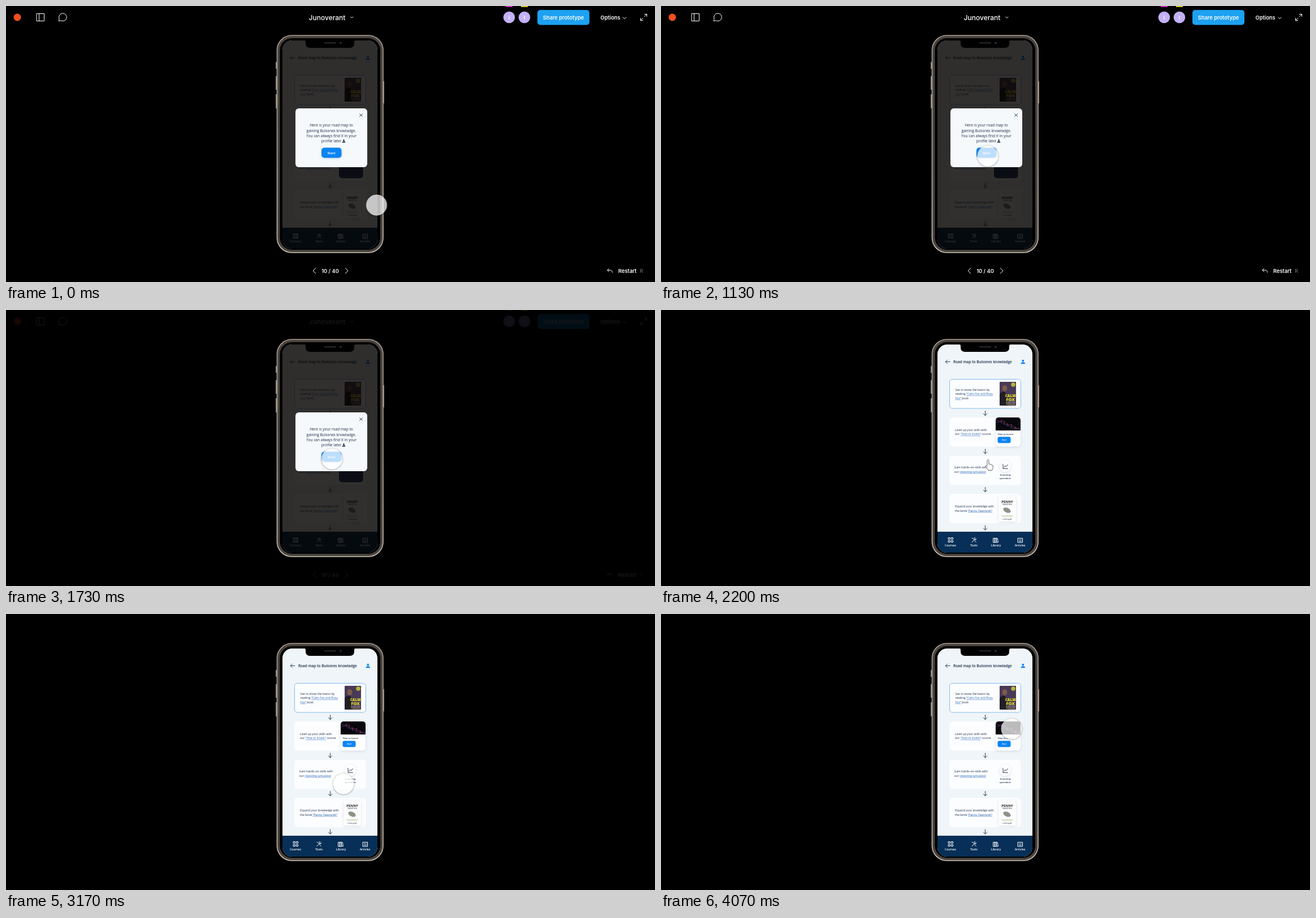
Recreate the animation shown at these times as an HTML page. Size 1148 px wide and 488 px high, loop 4.11 s.

```html
<!DOCTYPE html>
<html lang="en">
<head>
<meta charset="utf-8">
<title>Prototype walkthrough</title>
<style>
  html, body { margin: 0; width: 100%; height: 100%; overflow: hidden; background: #000; }
  svg { display: block; width: 100vw; height: 100vh; }
  text { white-space: pre; }
  .ui text { font: 600 9.3px Inter, sans-serif; fill: #fff; }
  .ui .name { font-size: 12px; font-weight: 500; }
  .app text { font: 400 5.13px "Open Sans", "Noto Sans", sans-serif; fill: #1b2c47; }
  .app .title { font-size: 6.45px; font-weight: 600; }
  .app .tab text { font-size: 5.2px; font-weight: 600; fill: #fff; }
  .app .msg text { font-size: 6.6px; }
  .app .tiny text { font-size: 4.2px; font-weight: 600; }
  .app .btn { font-weight: 700; fill: #fff; }
  .link { fill: #2465b5; text-decoration: underline; text-decoration-thickness: .4px; }
  .mid { text-anchor: middle; }
  .line { fill: none; stroke: #fff; stroke-width: 1; stroke-linecap: round; stroke-linejoin: round; }
  .ink { stroke: #1b2c47; stroke-width: .9; }
  .soft { filter: drop-shadow(0 1.5px 2px rgba(60, 90, 130, .2)); }

  .ui, .modal, .touch, .hand { animation: 4110ms linear infinite; }
  .ui { animation-name: ui; }
  .modal { animation-name: modal; }
  .touch { animation-name: touch; }
  .hand { animation-name: hand; }

  @keyframes ui {
    0%, 37.2% { opacity: 1; }
    42.1% { opacity: .09; }
    44%, 100% { opacity: 0; }
  }
  @keyframes modal {
    0%, 49.4% { opacity: 1; }
    53.2%, 100% { opacity: 0; }
  }
  @keyframes touch {
    0%, .73% { transform: translate(655.5px, 352px); opacity: 1; animation-timing-function: ease-in-out; }
    13.1% { transform: translate(578.5px, 267.5px); }
    27.5% { transform: translate(578px, 265px); }
    42.1% { transform: translate(576.5px, 263px); }
    51.1% { transform: translate(577px, 264px); opacity: 1; animation-timing-function: step-end; }
    51.11% { transform: translate(577px, 264px); opacity: 0; }
    58.39% { transform: translate(577px, 266px); opacity: 0; animation-timing-function: step-end; }
    58.4% { transform: translate(577px, 266px); opacity: 1; animation-timing-function: ease-in-out; }
    66.9%, 78.6% { transform: translate(597px, 300px); animation-timing-function: ease-in-out; }
    90%, 100% { transform: translate(620px, 203px); opacity: 1; }
  }
  @keyframes hand {
    0%, 51.1% { opacity: 0; animation-timing-function: step-end; }
    51.11%, 58.39% { opacity: 1; animation-timing-function: step-end; }
    58.4%, 100% { opacity: 0; }
  }
</style>
</head>
<body>
<svg viewBox="0 0 1148 488" xmlns="http://www.w3.org/2000/svg">
  <defs>
    <clipPath id="screen"><rect x="489" y="61" width="168" height="368" rx="17"/></clipPath>
    <clipPath id="chart"><path d="M592 213V195a5 5 0 0 1 5-5h34a5 5 0 0 1 5 5v18z"/></clipPath>
    <clipPath id="cover"><rect x="599" y="127" width="29" height="42" rx="1"/></clipPath>
    <linearGradient id="metal" x2="0" y2="1">
      <stop offset="0" stop-color="#aaa097"/>
      <stop offset=".5" stop-color="#b5aaa0"/>
      <stop offset="1" stop-color="#d2c8be"/>
    </linearGradient>
    <radialGradient id="halo">
      <stop offset=".84" stop-opacity="0"/>
      <stop offset=".85" stop-opacity=".2"/>
      <stop offset="1" stop-opacity="0"/>
    </radialGradient>
    <path id="down" class="line ink" d="M0-4V4M-3.3 .8L0 4L3.3 .8"/>
    <g id="user">
      <circle cy="-2" r="1.9"/>
      <path d="M-3.8 3.6v-.8C-3.8 .9-1.6 .5 0 .5S3.8 .9 3.8 2.8v.8z"/>
    </g>
  </defs>

  <rect width="1148" height="488"/>

  <!-- Viewer controls -->
  <g class="ui">
    <circle cx="20" cy="20" r="6.5" fill="#f24e1e"/>
    <path class="line" d="M54.5 13.5h13v13h-13zM58.5 13.5v13"/>
    <path class="line" d="M93.5 26.5l.5-4.300a6.900 6.900 0 1 1 3 3.600z"/>
    <text class="name mid" x="568" y="24.800">Junoverant</text>
    <path class="line" d="M609.500 19l2.200 2.200l2.200-2.200"/>
    <rect x="884" width="12" height="1.800" fill="#e128d2"/>
    <rect x="911" width="12" height="1.800" fill="#efdb18"/>
    <circle cx="890" cy="20" r="10.300" fill="#c3b0f6"/>
    <circle cx="917" cy="20" r="10.300" fill="#c3b0f6"/>
    <text class="mid" x="890" y="23.500">I</text>
    <text class="mid" x="917" y="23.500">I</text>
    <rect x="940" y="7" width="92" height="26.500" rx="5" fill="#1da1f2"/>
    <text class="mid" x="986" y="23.500">Share prototype</text>
    <text x="1051.500" y="23.500">Options</text>
    <path class="line" d="M1091.500 20l2.700 2.700l2.700-2.700"/>
    <path class="line" d="M1129.500 14.500h4v4M1133.300 14.700l-4 4M1126.500 25.500h-4v-4M1122.700 25.300l4-4"/>
    <path class="line" d="M547.800 463.500l-4.800 4.700l4.800 4.700M600.200 463.500l4.800 4.700l-4.800 4.700"/>
    <text class="mid" x="573.500" y="471.500">10 / 40</text>
    <path class="line" d="M1066.500 464.500l-2.800 2.700l2.800 2.700M1064 467.200h5.500q3 0 3 3.800"/>
    <text x="1083" y="471.500">Restart</text>
    <text x="1121" y="471.500" style="fill:#777;font-weight:400">R</text>
  </g>

  <!-- Phone body -->
  <g fill="#8d8276">
    <rect x="477" y="99" width="2" height="12"/>
    <rect x="477" y="124" width="2" height="24"/>
    <rect x="477" y="156" width="2" height="25"/>
    <rect x="667" y="133" width="2" height="39" fill="#947a70"/>
  </g>
  <rect x="479.500" y="52" width="187.500" height="384" rx="26" fill="#4a443f" stroke="url(#metal)" stroke-width="1.500"/>
  <rect x="484" y="56.500" width="178.500" height="375" rx="22" fill="#000" stroke="#423d39"/>

  <g class="app" clip-path="url(#screen)">
    <rect x="489" y="61" width="168" height="370" fill="#eff5f8"/>
    <path class="line ink" d="M511 91.500h-7.800M506.500 88.200l-3.300 3.300l3.300 3.300"/>
    <text class="title" x="517" y="94">Road map to Buissnes knowladge</text>
    <use href="#user" x="640.300" y="91.700" fill="#0c84f3"/>

    <g fill="#fcfdff">
      <rect x="510.500" y="122.500" width="126" height="51.500" rx="5" stroke="#86b9f0"/>
      <rect x="510" y="190" width="126.500" height="51.500" rx="5"/>
      <rect x="510" y="258" width="126.500" height="51.500" rx="5"/>
      <rect x="510" y="325" width="126.500" height="52" rx="5"/>
    </g>
    <use href="#down" x="573.500" y="182.500"/>
    <use href="#down" x="573.500" y="250"/>
    <use href="#down" x="573.500" y="317.500"/>
    <use href="#down" x="573.500" y="385"/>

    <!-- First book -->
    <text x="520.500" y="143">Get to know the basics by</text>
    <text x="520.500" y="150.300">reading <tspan class="link">“Calm Fox and Busy</tspan></text>
    <text x="520.500" y="157.700"><tspan class="link">Fox”</tspan> book</text>
    <g clip-path="url(#cover)">
      <rect x="599" y="127" width="29" height="42" fill="#493a56"/>
      <path d="M599 169v-18q1-7 8-7q5 1 6 25z" fill="#201e26"/>
      <ellipse cx="608" cy="138.500" rx="4.300" ry="5.600" fill="#7d5a4b"/>
      <circle cx="623" cy="132" r="3.800" fill="#b7b43c"/>
      <text class="mid" x="618" y="153.500" style="font-size:6.400px;font-weight:800;fill:#e6e421">CALM</text>
      <text class="mid" x="618" y="160.500" style="font-size:7.500px;font-weight:800;fill:#e6e421">FOX</text>
      <text class="mid" x="618" y="164.500" style="font-size:3.600px;fill:#d8d3de">BUSY FOX</text>
      <rect x="610" y="166" width="16" height="1" fill="#a39a3b"/>
    </g>

    <!-- Course -->
    <text x="520" y="214">Level up your skills with</text>
    <text x="520" y="221.300">our <tspan class="link">“How to invest”</tspan> course</text>
    <g class="tiny">
      <rect class="soft" x="592" y="190" width="44" height="51.500" rx="5" fill="#fff"/>
      <g clip-path="url(#chart)" fill="none" stroke-width=".7">
        <rect x="592" y="190" width="44" height="23" fill="#07070d"/>
        <path d="M592 194l8 3l5-1l7 6l8 1l6 5l10 3" stroke="#8c2c62"/>
        <path d="M593 200l7-3l7 5l7 2l8 5l14 1" stroke="#3b4c82"/>
        <path d="M602 194v5M607 196v6M613 200v6M620 202v6M627 206v5" stroke="#b34a80"/>
      </g>
      <text x="595.500" y="220.500">How to invest</text>
      <rect x="595.500" y="224.300" width="23" height="11" rx="3" fill="#0c84f3"/>
      <text class="btn mid" x="607" y="231.200" style="font-size:3.700px">Start</text>
    </g>

    <!-- Simulator -->
    <text x="518.700" y="280.300">Gain hands-on skills with</text>
    <text x="518.700" y="287.700">our <tspan class="link">investing symulator</tspan></text>
    <g class="tiny">
      <circle class="soft" cx="609" cy="276.500" r="10" fill="#fff"/>
      <path class="line ink" d="M605 272.500v8h8.500M606.500 278.300l2.300-2.800l1.800 1.500l2.700-3.500"/>
      <text class="mid" x="609" y="293.200">Investing</text>
      <text class="mid" x="609" y="298.800">symulator</text>
    </g>

    <!-- Second book -->
    <text x="520" y="349.300">Expand your knowledge with</text>
    <text x="520" y="356.500">the book <tspan class="link">“Penny Twentyish”</tspan></text>
    <rect class="soft" x="597" y="330" width="31" height="44" fill="#fdfdfb"/>
    <text class="mid" x="612.500" y="340.500" style="font-size:6px;font-weight:700;fill:#22252a">PENNY</text>
    <text class="mid" x="612.500" y="344.500" style="font-size:3.200px">TWENTYISH</text>
    <ellipse cx="612" cy="354" rx="7" ry="4" transform="rotate(25 612 354)" fill="#8c9289"/>
    <path d="M602 363.500h21M604 365.500h17" stroke="#98b287" stroke-width=".7" stroke-dasharray="3 .7"/>
    <text class="mid" x="612.500" y="371" style="font-size:2.700px">a short guide</text>

    <!-- Tab bar -->
    <g class="tab">
      <rect x="489" y="392" width="168" height="39" fill="#072f57"/>
      <g class="line">
        <path d="M508.500 402.500h2.800v2.800h-2.800zM513.700 402.500h2.800v2.800h-2.800zM508.500 407.700h2.800v2.800h-2.800zM513.700 407.700h2.800v2.800h-2.800z"/>
        <path d="M550 410.500l6-6M550 403l2 2M554.500 407.700l2.800 2.800M555.500 402.500a2 2 0 1 0 2 2"/>
        <path d="M588 403.500h2.500v7.500h-2.500zM590.500 403.500h2.500v7.500h-2.500zM593.200 404l2 -.5l1.300 7l-2 .5z"/>
        <path d="M631.500 403.500h8v7.500h-8zM633.500 406h2M633.500 408.700h4M637 406h.5"/>
      </g>
      <text class="mid" x="512" y="417.700">Courses</text>
      <text class="mid" x="553.500" y="417.700">Tools</text>
      <text class="mid" x="592.500" y="417.700">Library</text>
      <text class="mid" x="635" y="417.700">Articles</text>
    </g>

    <!-- Welcome dialog -->
    <g class="modal">
      <rect x="489" y="61" width="168" height="370" fill="#060300" fill-opacity=".82"/>
      <rect x="589" y="262" width="42.500" height="42.500" rx="5" fill="#0a0d13"/>
      <rect x="512" y="181" width="127" height="104" rx="6" fill="#f6f9fb"/>
      <path class="line ink" d="M625.500 190.500l5 5m0-5l-5 5"/>
      <g class="msg">
        <text class="mid" x="575.500" y="213.300">Here is your road map to</text>
        <text class="mid" x="575.500" y="222.600">gaining Buissnes knowladge.</text>
        <text class="mid" x="575.500" y="232">You can always find it in your</text>
        <text class="mid" x="575.500" y="241.300">profile later</text>
      </g>
      <use href="#user" transform="translate(597.500 238.800) scale(.75)" fill="#1b2c47"/>
      <rect class="soft" x="558" y="250.500" width="35.500" height="18" rx="5" fill="#0c84f3"/>
      <text class="btn mid" x="575.700" y="261.600" style="font-size:5.600px">Start</text>
    </g>
  </g>

  <!-- Notch -->
  <path d="M528 60.500h90q-2 .5-2 3v2.500q0 8-8 8h-70q-8 0-8-8v-2.500q0-2.500-2-3z"/>
  <rect x="563" y="64" width="21" height="2.600" rx="1.300" fill="#24242a"/>
  <circle cx="592" cy="65.300" r="2" fill="#232844"/>

  <!-- Pointers -->
  <g class="touch">
    <circle cy=".8" r="21" fill="url(#halo)"/>
    <circle r="18" fill="#fff" fill-opacity=".73" stroke="#fff" stroke-opacity=".75" stroke-width=".9"/>
  </g>
  <path class="hand" d="M577 266.500q0-1.800 1.500-1.800t1.500 1.800v6q2.400-1 2.700 .8q2.200-.8 2.400 1q2-.5 2 1.500v3q0 2-1.300 3.700v1h-7.300v-1.200l-4-5.300q-.8-1.800 .7-2q.8 0 1.800 1.500z" fill="#fff" stroke="#3c434c" stroke-width=".8" stroke-linejoin="round"/>
</svg>
</body>
</html>
```
